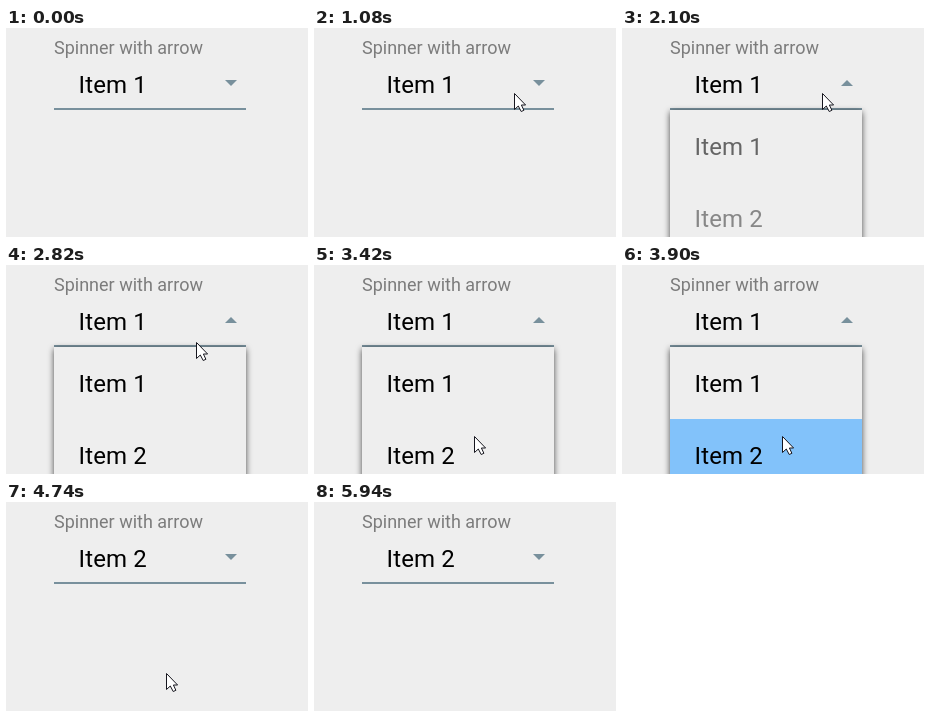
Recreate the animation shown at these times as an HTML page. Size 302 px wide and 209 px high, loop 7.2 s.

```html
<!DOCTYPE html>
<html lang="en">
<head>
<meta charset="utf-8">
<title>Spinner with arrow</title>
<style>
  html, body { margin: 0; width: 100%; height: 100%; overflow: hidden; background: #eee; }
  svg { display: block; width: 302px; height: 209px; font: 24px Roboto, sans-serif; letter-spacing: .15px; }
  .label { font-size: 18px; letter-spacing: 0; fill: #7c7c7c; }
  .accent { fill: #78909c; }
  #popup { filter: drop-shadow(0 2px 3.2px rgba(0, 0, 0, .7)); }
</style>
</head>
<body>
<svg viewBox="0 0 302 209">
  <defs>
    <clipPath id="fieldClip"><rect x="48" y="6" width="192" height="76" rx="4"/></clipPath>
    <clipPath id="rowClip"><rect x="48" y="154" width="192" height="72"/></clipPath>
  </defs>
  <rect width="302" height="209" fill="#eee"/>
  <path id="fieldWave" clip-path="url(#fieldClip)" fill="#c6c6c6" fill-rule="evenodd"/>
  <text class="label" x="48" y="26">Spinner with arrow</text>
  <text id="value" x="72.5" y="65">Item 1</text>
  <rect class="accent" x="48" y="80" width="192" height="2"/>
  <path id="arrow" class="accent" d="M219 52h12l-6 6z"/>
  <g id="menu">
    <rect id="popup" x="48" y="82" width="192" height="150" fill="#eee"/>
    <path id="rowWave" clip-path="url(#rowClip)" fill="#82c2fa" fill-rule="evenodd"/>
    <text id="row1" x="72.5" y="127">Item 1</text>
    <text id="row2" x="72.5" y="199">Item 2</text>
  </g>
  <path id="cursor" d="M.5 .5V16.5L4.3 13 7.2 18.5 9.9 17.3 7.4 12H11.6Z"
        fill="#fff" stroke="#16161e" stroke-linejoin="round"/>
</svg>
<script>
const LOOP = 7200, STEP = 60;
const $ = id => document.getElementById(id);
const clamp = v => Math.min(1, Math.max(0, v));
const easeOut = p => 1 - (1 - p) ** 2;
const ramp = (t, from, to) => clamp((t - from) / (to - from));

// time, x, y
const pointer = [
  [600, 310, 54], [660, 288, 55], [780, 256, 59], [900, 213, 68], [1080, 200, 65],
  [2760, 200, 65], [2820, 190, 77], [2940, 179, 97], [3180, 177, 140], [3420, 160, 171],
  [5460, 160, 171], [5520, 226, 151], [5640, 226, 151], [5880, 292, 57], [5940, 310, 40]
];

function pointAt(t) {
  const i = pointer.findIndex(k => k[0] > t);
  if (i < 1) return [320, 40];
  const [a, b] = [pointer[i - 1], pointer[i]];
  const p = ramp(t, a[0], b[0]);
  return [a[1] + (b[1] - a[1]) * p, a[2] + (b[2] - a[2]) * p];
}

const circle = (x, y, r) =>
  r > 0 ? `M${x - r} ${y}a${r} ${r} 0 1 0 ${2 * r} 0a${r} ${r} 0 1 0 ${-2 * r} 0z` : '';

// A disc spreads out, then a hole opens from the same point.
function wave(id, x, y, max, grow, hole) {
  $(id).setAttribute('d', hole < 1 ? circle(x, y, max * grow) + circle(x, y, max * hole) : '');
}

function draw(time) {
  const t = Math.floor(time / STEP) * STEP;
  const closing = ramp(t, 4500, 4740);
  const open = ramp(t, 1740, 2100) * (1 - closing);
  const turn = easeOut(ramp(t, 1740, 2100)) - easeOut(closing);

  wave('fieldWave', 200, 70, 166, easeOut(ramp(t, 1320, 1560)), easeOut(ramp(t, 1500, 1800)));
  wave('rowWave', 160, 171, 126, easeOut(ramp(t, 3600, 3900)), easeOut(ramp(t, 4080, 4380)));

  $('value').textContent = t < 4560 ? 'Item 1' : 'Item 2';
  $('arrow').setAttribute('transform', `rotate(${180 * turn} 225 55)`);
  $('menu').setAttribute('opacity', open);
  $('row1').setAttribute('opacity', ramp(t, 1860, 2280));
  $('row2').setAttribute('opacity', ramp(t, 1920, 2340));
  $('cursor').setAttribute('transform', `translate(${pointAt(t).map(Math.round)})`);
}

const start = performance.now();
function tick() {
  draw((performance.now() - start) % LOOP);
  requestAnimationFrame(tick);
}
tick();
</script>
</body>
</html>
```
